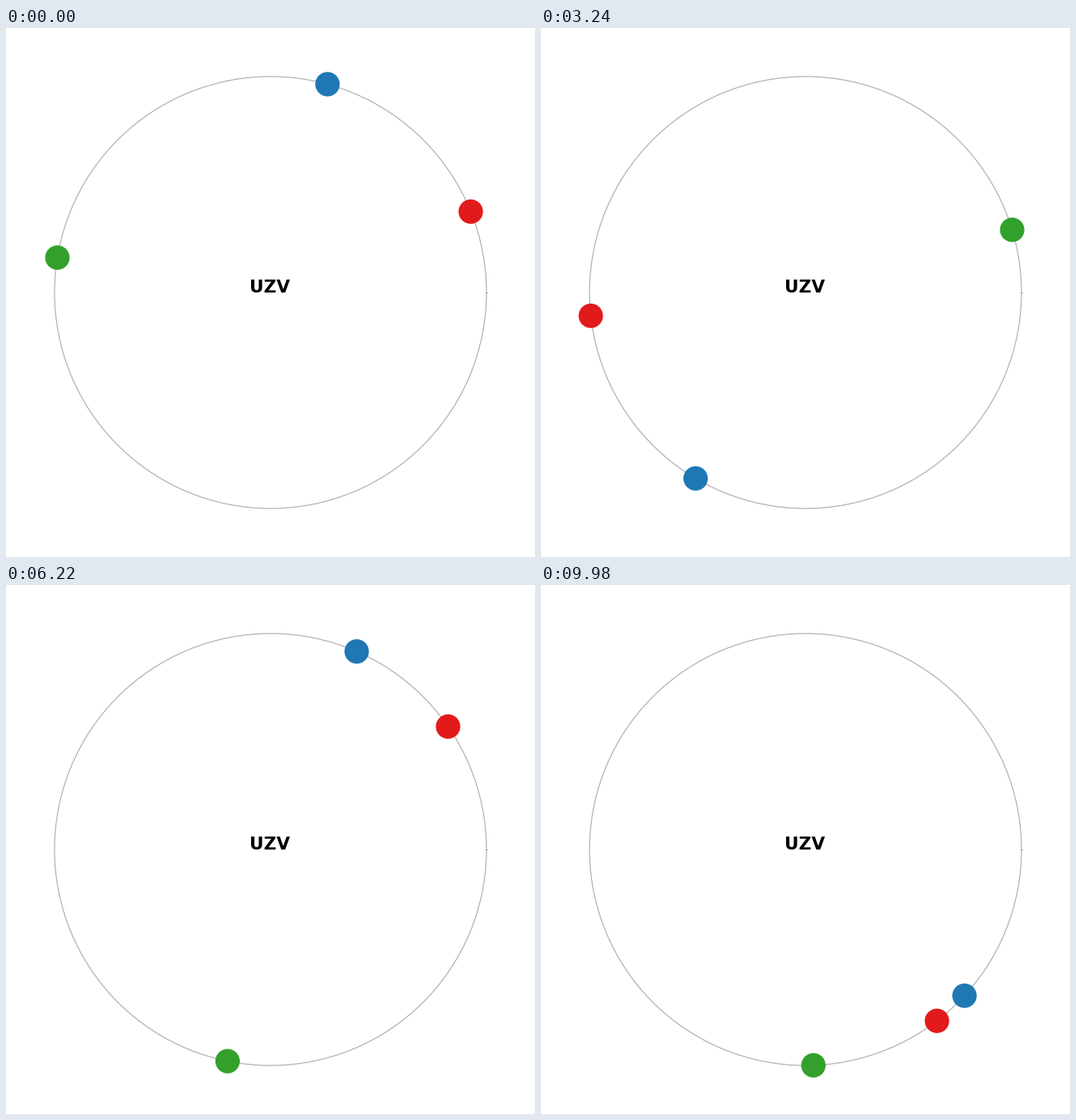
Write a matplotlib script that moves like this. It is 654 by 654 pixels and loops after 10000 ms.

```python
import numpy as np
import matplotlib.pyplot as plt
from matplotlib.animation import FuncAnimation
from matplotlib.patches import Circle

SIZE = 654
DPI = 109
FRAMES = 500
STEP = 20  # ms
CENTER = SIZE / 2
RADIUS = 267
DOT = 15.1
COLORS = ["#e31a1c", "#1f78b4", "#33a02c"]

# Key poses: seconds -> degrees counter-clockwise for red, blue, green
POSES = {
    0.46: (22, 74.7, 170.7),
    2.24: (161.15, 217.1, 333.7),
    3.10: (188, 241, 375),
    4.24: (137, 194, 355.2),
    5.46: (71.3, 116.1, 292.7),
    7.06: (4.9, 29.9, 246.7),
    8.56: (-16.2, 20.8, 290.3),
    9.98: (-52.5, -42.6, 272.1),
}


def spline(x, y, t):
    """Natural cubic spline through the rows of y, constant outside x."""
    h, n = np.diff(x), len(x)
    slope = np.diff(y, axis=0) / h[:, None]
    a, b = np.eye(n), np.zeros_like(y)
    for i in range(1, n - 1):
        a[i, i - 1:i + 2] = h[i - 1], 2 * (h[i - 1] + h[i]), h[i]
        b[i] = 6 * (slope[i] - slope[i - 1])
    m = np.linalg.solve(a, b)
    t = np.clip(t, x[0], x[-1])
    i = np.clip(np.searchsorted(x, t) - 1, 0, n - 2)
    w = h[i][:, None]
    u = (t - x[i])[:, None] / w
    v = 1 - u
    bend = m[i] * (v**3 - v) + m[i + 1] * (u**3 - u)
    return y[i] * v + y[i + 1] * u + bend * w**2 / 6


def on_ring(angle):
    return CENTER + RADIUS * np.cos(angle), CENTER - RADIUS * np.sin(angle)


fig = plt.figure(figsize=(SIZE / DPI, SIZE / DPI), dpi=DPI, facecolor="white")
ax = fig.add_axes([0, 0, 1, 1])
ax.set_xlim(0, SIZE)
ax.set_ylim(SIZE, 0)
ax.axis("off")

ax.add_patch(Circle((CENTER, CENTER), RADIUS, fill=False,
                    edgecolor="#b0b0b0", linewidth=0.8))
ax.plot([593.4, 594.8], [CENTER, CENTER], color="#808080", linewidth=0.6,
        solid_capstyle="butt")
ax.text(CENTER - 0.5, CENTER, "UZV", family="DejaVu Sans", weight="bold",
        size=14.3, ha="center", va="baseline")
dots = [ax.add_patch(Circle((0, 0), DOT, facecolor=color, linewidth=0, zorder=3))
        for color in COLORS]

times = np.arange(FRAMES) * STEP / 1000
angles = np.radians(spline(np.array(list(POSES)),
                           np.array(list(POSES.values()), float), times))


def draw(frame):
    for dot, angle in zip(dots, angles[frame]):
        dot.center = on_ring(angle)
    return dots


anim = FuncAnimation(fig, draw, frames=FRAMES, interval=STEP,
                     repeat=True, repeat_delay=0, blit=False)
plt.show()
```
